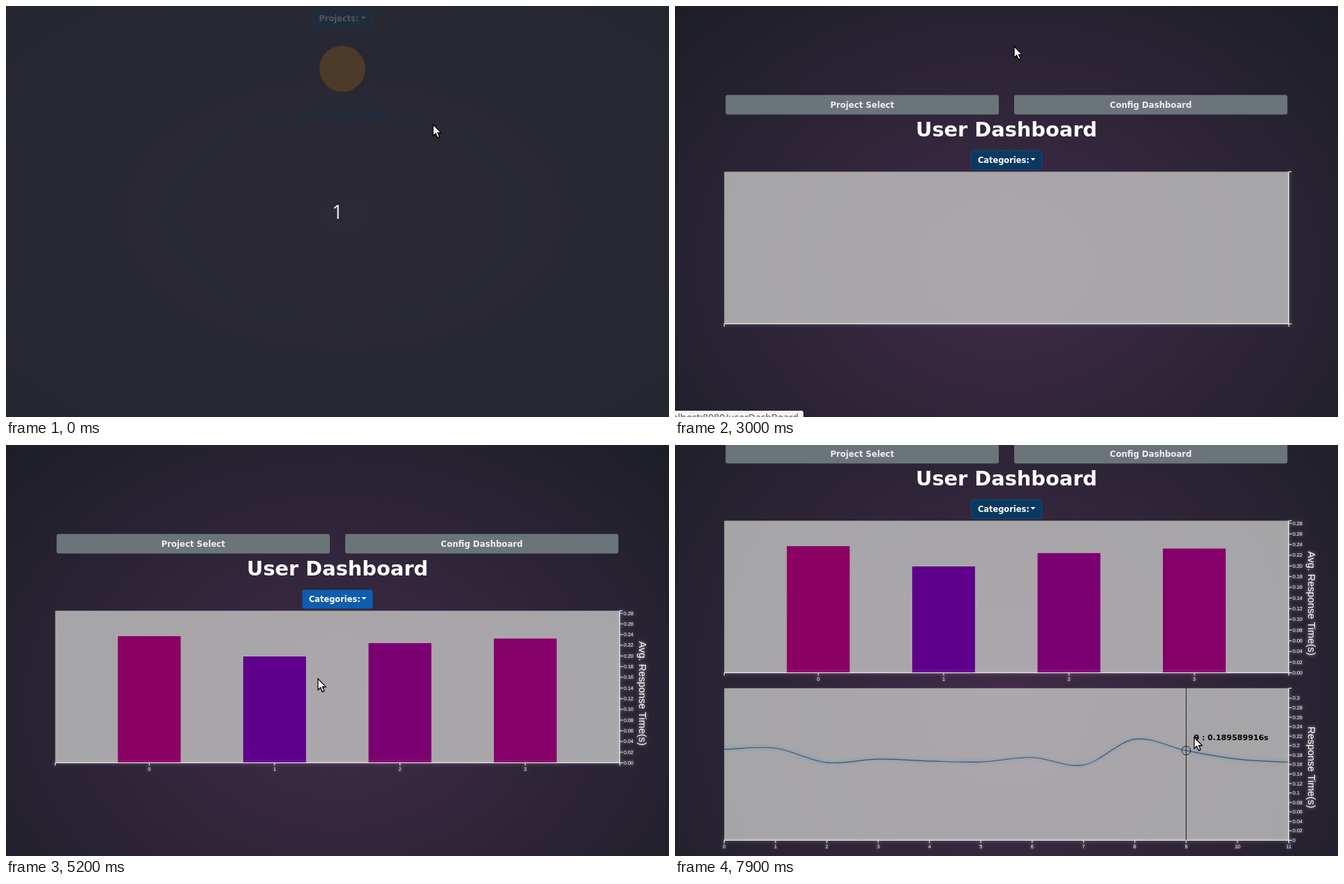
These frames come from a looping animation (950 by 589 pixels, 8000 ms). An HTML page with a canvas:

```html
<!DOCTYPE html>
<html lang="en">
<head>
<meta charset="utf-8">
<title>Dashboard tour</title>
<style>
html, body { margin: 0; width: 100%; height: 100%; overflow: hidden; background: #1c1e26; }
canvas { display: block; }
</style>
</head>
<body>
<canvas id="stage" width="950" height="589"></canvas>
<script>
const ctx = document.getElementById('stage').getContext('2d');
const LOOP = 8000, UI = '"DejaVu Sans", sans-serif', ARIAL = '"Liberation Sans", sans-serif';
const LEFT = 70.5, RIGHT = 879.5, CHART_H = 218, STEP = (RIGHT - LEFT) / 11;
const NAVY = '#0a3960', BLUE = '#0d5db0', GREY = '#6b7579', GREY_HOVER = '#596367';

// stops of the pointer: time, x, y
const stops = [
  [0, 612, 170], [300, 612, 170], [1200, 486, 20], [1600, 540, 50], [1900, 500, 60],
  [2100, 474, 94], [2300, 480, 60], [3000, 486, 58], [3800, 474, 218], [4100, 500, 230],
  [4600, 454, 267], [5100, 454, 270], [5300, 440, 400], [5400, 318, 439], [5900, 544, 347],
  [6600, 474, 391], [7200, 225, 412], [7700, 752, 430], [7900, 744, 419]
];
const averages = [.237, .199, .224, .2325];
const times = [.192518427, .194471835, .164152906, .171483062, .167394518, .165527194,
  .175028461, .159036127, .213572849, .189589916, .171462508, .165018372];

const clamp = v => Math.max(0, Math.min(1, v));
const smooth = p => p * p * (3 - 2 * p);
const easeCubic = p => p < .5 ? 4 * p ** 3 : 1 - 4 * (1 - p) ** 3;

function pointerAt(t) {
  const next = stops.findIndex(s => s[0] > t);
  const i = next < 0 ? stops.length - 1 : next;
  const [t0, x0, y0] = stops[i - 1], [t1, x1, y1] = stops[i];
  const p = smooth(clamp((t - t0) / (t1 - t0)));
  return { x: x0 + (x1 - x0) * p, y: y0 + (y1 - y0) * p, hand: false };
}

function glow(color, blur, dy = 0) {
  ctx.shadowColor = color; ctx.shadowBlur = blur; ctx.shadowOffsetY = dy;
}
const noGlow = () => glow('transparent', 0);

function text(str, x, y, size, { color = '#fff', family = UI, weight = 'bold', align = 'center' } = {}) {
  ctx.font = `${weight} ${size}px ${family}`;
  ctx.textAlign = align;
  ctx.fillStyle = color;
  ctx.fillText(str, x, y);
}
const label = (str, x, y, size, align) => text(str, x, y, size, { family: ARIAL, weight: '', align });

function line(...pts) {
  ctx.beginPath();
  pts.forEach(([x, y]) => ctx.lineTo(x, y));
  ctx.stroke();
}

function disc(x, y, r) {
  ctx.beginPath();
  ctx.arc(x, y, r, 0, 2 * Math.PI);
}

function button(name, x, y, w, h, pointer, { menu, lit, color } = {}) {
  const over = pointer.x >= x && pointer.x <= x + w && pointer.y >= y && pointer.y <= y + h;
  const mid = x + w / 2, base = y + h / 2 + 4;
  if (over) {
    pointer.hand = true;
    glow('rgba(120,120,205,.8)', 10, 4);
  }
  ctx.fillStyle = menu ? (over || lit ? BLUE : NAVY) : over ? GREY_HOVER : GREY;
  ctx.beginPath();
  ctx.roundRect(x, y, w, h, 3);
  ctx.fill();
  noGlow();
  if (!menu) return text(name, mid, base, 11.7, { color });
  ctx.strokeStyle = '#11497a'; ctx.lineWidth = 1;
  ctx.stroke();
  text(name, x + 9.5, base, 11.4, { align: 'left' });
  const tip = x + w - 12.5;
  ctx.beginPath();
  ctx.moveTo(tip - 3.5, base - 7); ctx.lineTo(tip + 3.5, base - 7); ctx.lineTo(tip, base - 3.5);
  ctx.fill();
}

function background(cx, cy, height) {
  const g = ctx.createRadialGradient(0, 0, 0, 0, 0, cx * Math.SQRT2);
  g.addColorStop(0, '#402b49');
  g.addColorStop(1, '#1c1e26');
  ctx.save();
  ctx.translate(cx, cy);
  ctx.scale(1, height / 2 / cx);
  ctx.fillStyle = g;
  ctx.fillRect(-1000, -2000, 2000, 4000);
  ctx.restore();
}

function selectPage(t, pointer) {
  const open = t >= 1400, drop = open ? 76 : 0;
  background(482, 300, 589);
  button('Projects:', 439, 5, 86, 26.5, pointer, { menu: true, lit: t >= 1300 && t < 2100 });
  if (open) ['DASHBOARD', 'CONFIG'].forEach((name, i) =>
    button(name, 430, 43 + 38 * i, 104, 27.5, pointer));
  ctx.fillStyle = '#dc8200';
  disc(482, 90 + drop, 33);
  ctx.fill();
  text('noteHue', 482.5, 167 + drop, 26, { color: NAVY });
  if (t < 100) {
    ctx.fillStyle = 'rgba(39,42,51,.8)';
    ctx.fillRect(0, 0, 950, 589);
    text('1', 475, 305, 28, { color: '#eee', family: '"Open Sans", sans-serif', weight: '' });
  }
}

function panel(top) {
  ctx.fillStyle = 'rgba(207,208,206,.75)';
  ctx.fillRect(LEFT, top, RIGHT - LEFT, CHART_H);
}

function axes(top, ready, { count, gap, format, marks, title, titleY }) {
  const base = top + CHART_H;
  glow('rgba(255,255,255,.7)', 5);
  ctx.strokeStyle = '#eee'; ctx.lineWidth = 1;
  line([LEFT, base + 4], [LEFT, base], [RIGHT, base], [RIGHT, base + 4]);
  line([RIGHT + 4, top], [RIGHT, top], [RIGHT, base], [RIGHT + 4, base]);
  if (ready) {
    for (let i = 0; i <= count; i++) {
      const y = base - i * gap;
      line([RIGHT, y], [RIGHT + 4, y]);
      label(format(i * .02), 885, y + 2.5, 7.2, 'left');
    }
    marks.forEach((x, i) => {
      line([x, base], [x, base + 4]);
      label(i, x, base + 11.5, 7.2);
    });
    ctx.save();
    ctx.translate(907, top + titleY);
    ctx.rotate(Math.PI / 2);
    label(title, 0, 0, 14.4);
    ctx.restore();
  }
  noGlow();
}

function barChart(t, top, pointer) {
  const base = top + CHART_H, gap = 15.32, grow = easeCubic(clamp((t - 4480) / 550));
  const mids = averages.map((_, i) => 205.3 + 179.6 * i);
  panel(top);
  averages.forEach((avg, i) => {
    const h = avg * gap / .02 * grow, x = mids[i] - 45, slow = (avg - .199) / .038;
    const over = pointer.x > x && pointer.x < x + 90 && pointer.y > base - h && pointer.y < base;
    ctx.fillStyle = over ? '#dbae66' : `rgb(${94 + 44 * slow},0,${139 - 40 * slow})`;
    ctx.fillRect(x, base - h, 90, h);
    if (over) text('{ countries { name languages {name}}}', mids[i], top + 25, 14.4,
      { color: '#000', family: ARIAL });
  });
  axes(top, t >= 4400, { count: 14, gap, format: v => v.toFixed(2), marks: mids,
    title: 'Avg. Response Time(s)', titleY: 118.5 });
}

function lineChart(top, pointer) {
  const base = top + CHART_H, gap = 13.57;
  const px = i => LEFT + STEP * i;
  const py = i => base - times[Math.max(0, Math.min(11, i))] * gap / .02;
  panel(top);
  ctx.beginPath();
  ctx.moveTo(px(0), py(0));
  for (let i = 0; i < 11; i++) ctx.bezierCurveTo(
    px(i + 1 / 3), py(i) + (py(i + 1) - py(i - 1)) / 6,
    px(i + 2 / 3), py(i + 1) - (py(i + 2) - py(i)) / 6,
    px(i + 1), py(i + 1));
  glow('rgba(70,110,140,.6)', 4);
  ctx.strokeStyle = '#2b5c85'; ctx.lineWidth = 1.1;
  ctx.stroke();
  noGlow();
  axes(top, true, { count: 15, gap, format: v => String(+v.toFixed(2)),
    marks: times.map((_, i) => px(i)), title: 'Response Time(s)', titleY: 113.5 });
  if (pointer.y > top && pointer.y < base) {
    const i = Math.round((pointer.x - LEFT) / STEP), x = px(i), y = py(i);
    ctx.strokeStyle = '#222'; ctx.lineWidth = 1;
    line([x, top], [x, base]);
    disc(x, y, 6.3);
    ctx.stroke();
    text(`${i} : ${times[i].toFixed(9)}s`, x + 11, y - 15, 11, { color: '#000', align: 'left' });
  }
}

function statusBar(top) {
  ctx.fillStyle = '#f5f5f3';
  ctx.beginPath();
  ctx.roundRect(-5, top, 189, 30, 3);
  ctx.fill();
  text('localhost:8080/userDashBoard', 177, top + 15, 13.8,
    { color: '#555', family: '"Noto Sans", sans-serif', weight: '', align: 'right' });
}

function dashboardPage(t, pointer) {
  const scroll = 129 * clamp((t - 6050) / 300), height = t < 6000 ? 740 : 980;
  background(475, height / 2 - scroll, height);
  ['Project Select', 'Config Dashboard'].forEach((name, i) =>
    button(name, 72.5 + 413.5 * i, 127.5 - scroll, 391.5, 28, pointer, { color: '#eee' }));
  text('User Dashboard', 475, 187 - scroll, 28.8);
  barChart(t, 237.5 - scroll, pointer);
  if (t >= 6000) lineChart(477.5 - scroll, pointer);
  button('Categories:', 424.5, 207.5 - scroll, 101, 27, pointer, { menu: true, lit: t >= 3700 && t < 5600 });
  if (t >= 3900 && t < 4400) button('Countries', 403, 245, 144, 27.5, pointer);
  if (t < 3200) statusBar(t < 3000 ? 567 : 580);
}

function drawPointer({ x, y, hand }) {
  const arrow = 'M0 0V16L3.7 12.6L6.3 18.6L9 17.4L6.5 11.7H11.3Z';
  const fist = 'M-1.5 1Q0 -1 1.5 1V6L8 7.5Q9 8 9 10L8 15.5H0L-4.5 9.5Q-4 7.5 -1.5 9Z';
  const shape = new Path2D(hand ? fist : arrow);
  ctx.save();
  ctx.translate(x, y);
  glow('rgba(0,0,0,.5)', 2, 1);
  ctx.fillStyle = '#fff';
  ctx.fill(shape);
  noGlow();
  ctx.strokeStyle = '#000'; ctx.lineWidth = 1.2;
  ctx.stroke(shape);
  ctx.restore();
}

function draw(now) {
  const t = Math.floor(now % LOOP / 100) * 100; // ten pictures a second
  const pointer = pointerAt(t);
  (t < 2400 ? selectPage : dashboardPage)(t, pointer);
  drawPointer(pointer);
}

let start;
function tick(now) {
  start ??= now;
  draw(now - start);
  requestAnimationFrame(tick);
}
draw(0);
requestAnimationFrame(tick);
</script>
</body>
</html>
```
